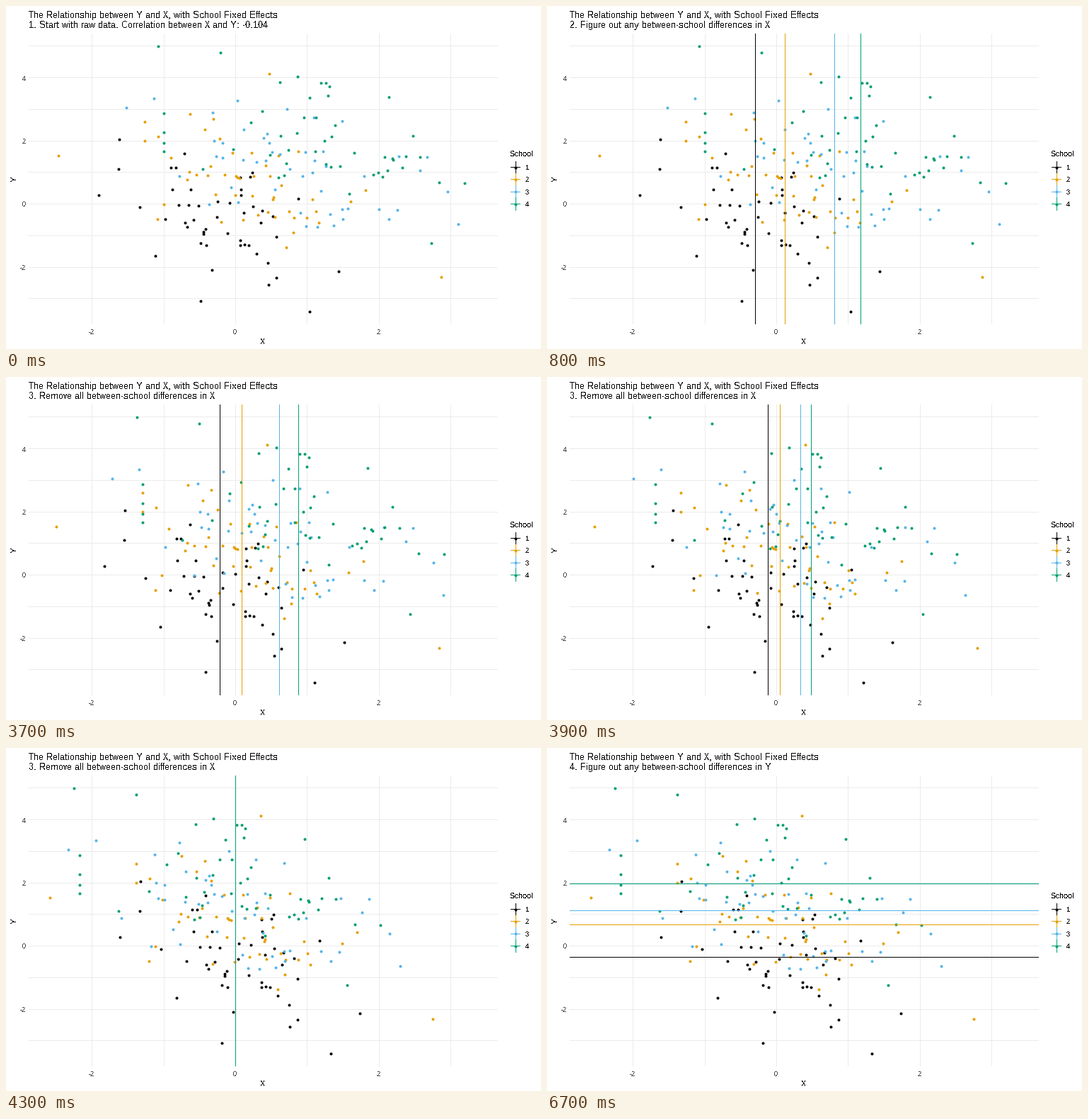
These frames come from a looping animation (756x486 px, 8 s). A matplotlib script:

```python
import math

import matplotlib.pyplot as plt
import numpy as np
from matplotlib.animation import FuncAnimation

WIDTH, HEIGHT, DPI = 756, 486, 72
LEFT, RIGHT, TOP, BOTTOM = 32, 695, 39, 451
ZERO_X, UNIT_X = 324.5, 101.4
ZERO_Y, UNIT_Y = 280.5, 44.75

STEP_MS, N_FRAMES = 100, 80
SHOW_X, MOVE, MOVE_STEPS, TITLE_4, SHOW_Y = 8, 35, 9, 64, 67

HEADING = "The Relationship between Y and X, with School Fixed Effects"
STEPS = [
    (0, "1. Start with raw data. Correlation between X and Y: -0.104"),
    (5, "2. Figure out any between-school differences in X"),
    (MOVE, "3. Remove all between-school differences in X"),
    (TITLE_4, "4. Figure out any between-school differences in Y"),
]

# Color, mean x, mean y, spread of x and a few outliers, in stage pixels
SCHOOLS = [
    ("#000000", 294.5, 296.5, 80, [(275, 418), (429, 433), (470, 376)]),
    ("#E69F00", 336.5, 250.5, 82, [(74, 212), (372, 96), (615, 384)]),
    ("#56B4E9", 406.5, 230.5, 108, [(170, 144), (624, 263), (639, 309)]),
    ("#009E73", 443.5, 192.5, 112, [(215, 57), (303, 66), (601, 336)]),
]
PUPILS, SLOPE, NOISE_Y, MAX_Z = 50, 0.22, 42, 1.9

plt.rcParams.update({
    "font.family": "Liberation Sans",
    "text.antialiased": False,
    "text.hinting": "native",
    "text.hinting_factor": 1,
    "lines.antialiased": False,
})


def school_points(rng, mean_x, mean_y, spread, outliers):
    """Noisy downward trend through the school mean, plus its outliers."""
    n = PUPILS - len(outliers)
    z = np.clip(rng.normal(size=(n, 2)), -MAX_Z, MAX_Z)
    dx, noise = ((z - z.mean(axis=0)) * [spread, NOISE_Y]).T
    core = np.column_stack([mean_x + dx, mean_y + SLOPE * dx + noise])
    return np.vstack([outliers, core])


def pixel_center(v):
    return math.floor(v) + 0.5


def vline(x, color, y0=TOP, y1=BOTTOM, z=1):
    return ax.plot([pixel_center(x)] * 2, [y0, y1], color=color, lw=1,
                   zorder=z, solid_capstyle="butt", snap=False)[0]


def hline(y, color, x0=LEFT, x1=RIGHT, z=1):
    return ax.plot([x0, x1], [pixel_center(y)] * 2, color=color, lw=1,
                   zorder=z, solid_capstyle="butt", snap=False)[0]


def dots(xs, ys, color):
    return ax.plot(np.round(xs), np.round(ys), "o", color=color, ms=4, mew=0,
                   zorder=2, snap=False)[0]


def label(x, y, text, size, color="black", **kw):
    return ax.text(x, y, text, fontsize=size, color=color, **kw)


def draw_grid():
    for v in range(-2, 4):
        x = ZERO_X + v * UNIT_X
        vline(x, "#EBEBEB")
        if v % 2 == 0:
            label(x - 1, 465, f"{v}", 9, "#4D4D4D", ha="center")
    for v in range(-3, 6):
        y = ZERO_Y - v * UNIT_Y
        hline(y, "#EBEBEB")
        if v % 2 == 0:
            label(27.5, y + 4, f"{v}", 9, "#4D4D4D", ha="right")
    label(362.5, 479, "X", 11, ha="center")
    label(12, 245, "Y", 11, ha="center", va="center", rotation=90)


def draw_legend():
    label(712, 213, "School", 11)
    for i, (color, *_) in enumerate(SCHOOLS):
        y = 228.7 + 17.28 * i
        vline(720, color, y - 8.64, y + 8.64)
        hline(y, color, 713, 727)
        dots([720], [y], color)
        label(734, y + 3.5, f"{i + 1}", 9)


fig = plt.figure(figsize=(WIDTH / DPI, HEIGHT / DPI), dpi=DPI,
                 facecolor="white")
ax = fig.add_axes([0, 0, 1, 1])
ax.set_xlim(0, WIDTH)
ax.set_ylim(HEIGHT, 0)
ax.axis("off")

draw_grid()
draw_legend()
label(32, 17, HEADING, 13)
subtitle = label(32, 31, "", 13)

rng = np.random.default_rng(12)
groups = []
for color, mean_x, mean_y, spread, outliers in SCHOOLS:
    points = school_points(rng, mean_x, mean_y, spread, outliers)
    groups.append((mean_x, points[:, 0], dots(*points.T, color),
                   vline(mean_x, color, z=3), hline(mean_y, color, z=3)))


def update(frame):
    subtitle.set_text([text for start, text in STEPS if frame >= start][-1])
    t = min(max((frame - MOVE + 1) / MOVE_STEPS, 0), 1)
    eased = (1 - math.cos(math.pi * t)) / 2
    for mean_x, xs, cloud, x_line, y_line in groups:
        shift = eased * (ZERO_X - mean_x)
        cloud.set_xdata(np.round(xs + shift))
        x_line.set_xdata([pixel_center(mean_x + shift)] * 2)
        x_line.set_visible(SHOW_X <= frame < TITLE_4)
        y_line.set_visible(frame >= SHOW_Y)


anim = FuncAnimation(fig, update, frames=N_FRAMES, interval=STEP_MS,
                     repeat=True, repeat_delay=0)
plt.show()
```
